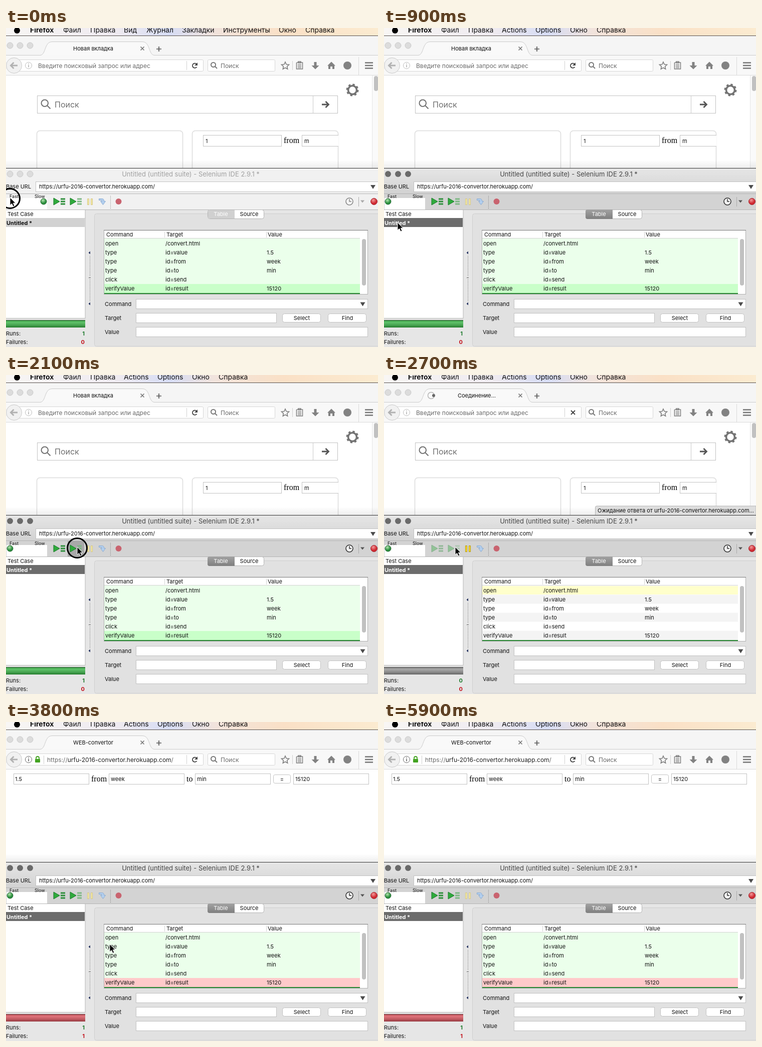
These frames come from a looping animation (742 px wide and 638 px high, 6 s). An HTML page:

```html
<!DOCTYPE html>
<html lang="ru">
<head>
<meta charset="utf-8">
<title>Selenium IDE</title>
<style>
html, body { margin: 0; width: 100%; height: 100%; overflow: hidden; background: #fff; }
svg { display: block; width: 742px; height: 638px; }
text { font: 11px Inter, sans-serif; fill: #111; white-space: pre; }
.menu text { font-size: 14px; }
.b, .menu .b { font-weight: 700; }
.mid { text-anchor: middle; }
.end { text-anchor: end; }
.url { font-size: 12px; fill: #6b6b6b; }
.title { font-size: 13px; fill: #444; text-anchor: middle; }
.serif { font: 16px "Liberation Serif", serif; fill: #000; }
.field { fill: #fff; stroke: #c2c2c2; }
.line { fill: none; stroke: #777; }

/* Timeline: every state is switched on and off by a hard step. */
.blur, .focus, .pass, .run, .fail, .idle, .home, .page, .newtab, .load, .result, .hover, .click {
  animation: 6s step-end infinite;
}
.blur { animation-name: blur; }
.focus { animation-name: focus; }
.pass { animation-name: pass; }
.run { animation-name: run; }
.fail { animation-name: fail; }
.idle { animation-name: idle; }
.home { animation-name: home; }
.page { animation-name: page; }
.newtab { animation-name: pass; }
.load { animation-name: load; }
.result { animation-name: result; }
.hover { animation-name: hover; }
.click { animation-name: click; }
@keyframes blur { 0% { visibility: visible } 3.3%, 100% { visibility: hidden } }
@keyframes focus { 0% { visibility: hidden } 3.3%, 100% { visibility: visible } }
@keyframes pass { 0% { visibility: visible } 36.6%, 100% { visibility: hidden } }
@keyframes run { 0% { visibility: hidden } 36.6% { visibility: visible } 48.3%, 100% { visibility: hidden } }
@keyframes fail { 0% { visibility: hidden } 48.3%, 100% { visibility: visible } }
@keyframes idle { 0% { visibility: visible } 36.6% { visibility: hidden } 48.3%, 100% { visibility: visible } }
@keyframes home { 0% { visibility: visible } 46.6%, 100% { visibility: hidden } }
@keyframes page { 0% { visibility: hidden } 46.6%, 100% { visibility: visible } }
@keyframes load { 0% { visibility: hidden } 36.6% { visibility: visible } 46.6%, 100% { visibility: hidden } }
@keyframes result { 0% { visibility: hidden } 51.6%, 100% { visibility: visible } }
@keyframes hover {
  0% { visibility: hidden } 31.6% { visibility: visible } 36.6% { visibility: hidden }
  48.3% { visibility: visible } 54.9%, 100% { visibility: hidden }
}
@keyframes click {
  0% { visibility: visible } 3.3% { visibility: hidden }
  33.3% { visibility: visible } 36.6%, 100% { visibility: hidden }
}
.cursor { animation: move 6s ease-in-out infinite; }
@keyframes move {
  0%, 4% { transform: translate(8px, 339px) }
  12%, 20% { transform: translate(27px, 389px) }
  33%, 53% { transform: translate(142px, 344px) }
  70%, 77% { transform: translate(237px, 491px) }
  81.5%, 100% { transform: translate(262px, 655px) }
}
.spin { transform-origin: 94px 41px; animation: spin 1s linear infinite; }
@keyframes spin { from { transform: rotate(108deg) } to { transform: rotate(468deg) } }
</style>
</head>
<body>
<svg viewBox="0 0 742 638">
  <defs>
    <linearGradient id="sky">
      <stop offset="0" stop-color="#f8f6f4"/><stop offset=".3" stop-color="#eeeaf0"/>
      <stop offset=".44" stop-color="#d6dcf4"/><stop offset=".56" stop-color="#f1e3dc"/>
      <stop offset=".75" stop-color="#fae0c6"/><stop offset="1" stop-color="#fbebd0"/>
    </linearGradient>
    <linearGradient id="shade" x2="0" y2="1">
      <stop offset="0" stop-color="#000" stop-opacity="0"/><stop offset="1" stop-color="#000" stop-opacity=".07"/>
    </linearGradient>
    <linearGradient id="bar" x2="0" y2="1">
      <stop offset="0" stop-color="#e6e6e6"/><stop offset="1" stop-color="#d2d2d2"/>
    </linearGradient>
    <linearGradient id="tab" x2="0" y2="1">
      <stop offset="0" stop-color="#a2a2a2"/><stop offset="1" stop-color="#7f7f7f"/>
    </linearGradient>
    <linearGradient id="gloss" x2="0" y2="1">
      <stop offset="0" stop-color="#000" stop-opacity=".25"/><stop offset=".3" stop-color="#fff" stop-opacity=".2"/>
      <stop offset="1" stop-color="#000" stop-opacity=".3"/>
    </linearGradient>
    <radialGradient id="green" cx=".4" cy=".3">
      <stop offset="0" stop-color="#b5e6b0"/><stop offset="1" stop-color="#278c3a"/>
    </radialGradient>
    <radialGradient id="red" cx=".4" cy=".3">
      <stop offset="0" stop-color="#f29a9a"/><stop offset="1" stop-color="#cf2830"/>
    </radialGradient>
    <g id="lights"><circle cx="8" r="6"/><circle cx="28" r="6"/><circle cx="48" r="6"/></g>
    <g id="lens" fill="none"><circle cx="-1.5" cy="-1.5" r="4.5"/><path d="M2 2 6 6"/></g>
    <path id="play" d="M0-7 12 0 0 7Z" fill="#2faa3c" stroke="#1c7a2b"/>
    <clipPath id="urlclip"><rect x="60" y="60" width="274" height="30"/></clipPath>
    <clipPath id="cardclip"><rect x="371" y="205" width="292" height="75"/></clipPath>
  </defs>

  <!-- Menu bar -->
  <g class="menu">
    <rect width="742" height="15" fill="url(#sky)"/>
    <circle cx="22" cy="5" r="6"/>
    <text class="b" x="48" y="9">Firefox</text>
    <text x="114" y="9">Файл</text><text x="168" y="9">Правка</text>
    <g class="blur">
      <text x="235" y="9">Вид</text><text x="280" y="9">Журнал</text><text x="351" y="9">Закладки</text>
      <text x="433" y="9">Инструменты</text><text x="544" y="9">Окно</text><text x="597" y="9">Справка</text>
    </g>
    <g class="focus">
      <text x="235" y="9">Actions</text><text x="302" y="9">Options</text>
      <text x="371" y="9">Окно</text><text x="424" y="9">Справка</text>
    </g>
    <rect y="15" width="742" height="1" fill="#57504c"/>
  </g>

  <!-- Browser -->
  <rect y="16" width="742" height="79" fill="#f5f5f5"/>
  <use href="#lights" y="35" fill="#dcdcdc" stroke="#c9c9c9"/>
  <path d="M0 54.500H68C80 54 76 27.500 92 27.500H272C288 27.500 284 54 296 54.500H742" fill="#f9f9f9" stroke="#cbcbcb"/>
  <rect y="55" width="742" height="39" fill="#f8f8f8"/>
  <path class="line" d="M0 94.500H742M703.500 58V94" style="stroke:#dadada"/>
  <g class="newtab"><text class="mid" x="174" y="45">Новая вкладка</text></g>
  <g class="load">
    <text class="mid" x="185" y="45">Соединение…</text>
    <g class="spin"><circle class="line" cx="94" cy="41" r="6.500" style="stroke:#b5b5b5;stroke-width:1.500"/><circle cx="99" cy="41" r="3" fill="#666"/></g>
  </g>
  <g class="page"><text class="mid" x="174" y="45">WEB-convertor</text></g>
  <path class="line" d="M268.500 37.500l7 7m0-7l-7 7" style="stroke-width:1.700"/>
  <path class="line" d="M300 42H310M305 37V47" style="stroke:#555;stroke-width:1.700"/>

  <rect class="field" x="20.500" y="63.500" width="373" height="23" rx="2" style="stroke:#d6d6d6"/>
  <circle cx="16" cy="75" r="15.500" fill="#f1f1f1" stroke="#cacaca"/>
  <path d="M23 75H10M15.500 69 9.500 75l6 6" fill="none" stroke="#b2b2b2" stroke-width="3"/>
  <path class="line" d="M360.500 66V84" style="stroke:#d0d0d0"/>
  <g class="home">
    <circle class="line" cx="45" cy="75" r="6.500" style="stroke:#bbb"/>
    <path d="M45 71v1.500M45 74v4.500" stroke="#aaa" stroke-width="1.500"/>
    <text class="url" x="64" y="80">Введите поисковый запрос или адрес</text>
  </g>
  <g class="page">
    <circle class="line" cx="45" cy="75" r="6.500" style="stroke:#666"/>
    <path d="M45 71v1.500M45 74v4.500" stroke="#555" stroke-width="1.500"/>
    <rect x="58" y="74" width="10" height="7" rx="1" fill="#43a321"/>
    <path d="M60 75V72a3 3 0 0 1 6 0v3" fill="none" stroke="#43a321" stroke-width="1.800"/>
    <path class="line" d="M75.500 67V84" style="stroke:#d0d0d0"/>
    <text class="url" x="82" y="80" clip-path="url(#urlclip)">https://<tspan fill="#222">urfu-2016-convertor.herokuapp.com</tspan>/</text>
  </g>
  <g class="idle"><path d="M380.500 78a4.700 4.700 0 1 1 0-5.500" fill="none" stroke="#444" stroke-width="1.800"/><path d="M382 69v6h-6Z" fill="#444"/></g>
  <path class="load" d="M373 71l8 8m0-8l-8 8" stroke="#444" stroke-width="2"/>
  <rect class="field" x="402.500" y="63.500" width="134" height="23" rx="2" style="stroke:#d6d6d6"/>
  <use href="#lens" x="415" y="75" stroke="#777" stroke-width="2"/>
  <text class="url" x="428" y="80">Поиск</text>

  <g fill="#828282">
    <path d="M557 68l2.200 4.800 5.300.6-3.900 3.600 1 5.200-4.600-2.600-4.600 2.600 1-5.200-3.900-3.600 5.300-.6Z" fill="none" stroke="#828282" stroke-width="1.700"/>
    <path d="M571.500 66V84" stroke="#d0d0d0"/>
    <path d="M580 69H591.500V82H579.500V69M583 67h5v3h-5ZM582 73.500h7M582 76.500h7M582 79.500h7" fill="none" stroke="#828282" stroke-width="1.600"/>
    <path d="M614.500 68h5v7h5l-7.500 7.500-7.500-7.500h5Z"/>
    <path d="M649 67.500l8 8h-2V82h-4v-5h-4v5h-4v-6.500h-2Z"/>
    <circle cx="681" cy="75" r="8"/>
    <path d="M716 69.500h16M716 75h16M716 80.500h16" stroke="#777" stroke-width="2.600"/>
  </g>

  <!-- New tab page -->
  <g class="home">
    <rect y="95" width="742" height="185" fill="#fff"/>
    <rect x="731" y="95" width="11" height="185" fill="#fafafa"/>
    <path d="M730.500 95V280" stroke="#e6e6e6"/>
    <rect x="734" y="96" width="8" height="30" rx="4" fill="#c1c1c1"/>
    <g class="line" style="stroke:#737373">
      <circle cx="691" cy="124" r="8.500" stroke-width="3.600"/>
      <circle cx="691" cy="124" r="11" stroke-width="3" stroke-dasharray="4.320"/>
    </g>
    <rect class="field" x="62.500" y="135.500" width="599" height="35"/>
    <path class="line" d="M612.500 136V170" style="stroke:#c8c8c8"/>
    <use href="#lens" transform="translate(79.500 152.500) scale(1.500)" stroke="#737373" stroke-width="1.400"/>
    <text x="97" y="159" style="font-size:16px;fill:#707070">Поиск</text>
    <path d="M630 153H642M637.500 147l6 6-6 6" fill="none" stroke="#555" stroke-width="2.800"/>
    <g fill="#fff" stroke="#dcdcdc" stroke-width="1.500">
      <rect x="61.500" y="205.500" width="291" height="90" rx="6"/>
      <rect x="371.500" y="205.500" width="291" height="90" rx="6"/>
    </g>
    <g clip-path="url(#cardclip)">
      <rect class="field" x="393.500" y="214.500" width="156" height="22"/>
      <rect class="field" x="590.500" y="214.500" width="156" height="22"/>
    </g>
    <text x="398" y="230">1</text><text class="serif" x="554" y="230">from</text><text x="595" y="230">m</text>
  </g>

  <!-- Converter page -->
  <g class="page">
    <rect y="95" width="742" height="185" fill="#fff"/>
    <g class="field">
      <rect x="15.500" y="103.500" width="150" height="21"/><rect x="205.500" y="103.500" width="150" height="21"/>
      <rect x="377.500" y="103.500" width="150" height="21"/><rect x="573.500" y="103.500" width="150" height="21"/>
      <rect x="533.500" y="105.500" width="34" height="17" rx="3"/>
    </g>
    <text x="18" y="118">1.5</text><text x="209" y="118">week</text><text x="381" y="118">min</text>
    <text class="serif" x="170" y="119">from</text><text class="serif" x="360" y="119">to</text>
    <text class="mid" x="550.500" y="118">=</text>
  </g>
  <text class="result" x="577" y="118">15120</text>
  <rect y="264" width="742" height="16" fill="url(#shade)"/>
  <g class="load">
    <path d="M421.500 280V265a3 3 0 0 1 3-3H742V280" fill="#dedede" stroke="#b4b4b4"/>
    <text x="426" y="275">Ожидание ответа от urfu-2016-convertor.herokuapp.com…</text>
  </g>

  <!-- IDE window -->
  <rect y="280" width="742" height="358" fill="#e6e6e6"/>
  <g class="blur">
    <rect y="281" width="742" height="82" fill="#f1f1f1"/>
    <use href="#lights" y="292" fill="#dcdcdc" stroke="#c9c9c9"/>
    <text class="title" x="368.500" y="297" style="fill:#a0a0a0">Untitled (untitled suite) - Selenium IDE 2.9.1 *</text>
  </g>
  <g class="focus">
    <rect y="281" width="742" height="50" fill="url(#bar)"/>
    <rect y="331" width="742" height="32" fill="#d3d3d3"/>
    <use href="#lights" y="292" fill="#6a6a6a"/>
    <text class="title" x="368.500" y="297">Untitled (untitled suite) - Selenium IDE 2.9.1 *</text>
  </g>
  <rect y="280" width="742" height="1" fill="#333"/>
  <text x="0" y="321">Base URL</text>
  <rect class="field" x="59.500" y="307.500" width="690" height="20"/>
  <text x="66" y="321">https://urfu-2016-convertor.herokuapp.com/</text>
  <path d="M727 314h10l-5 8Z" fill="#4c4c4c"/>
  <path class="line" d="M0 331.500H742M0 363.500H742" style="stroke:#b3b3b3"/>

  <!-- Toolbar -->
  <text x="7" y="340" style="font-size:9px">Fast</text><text x="57" y="340" style="font-size:9px">Slow</text>
  <rect x="1" y="340" width="81" height="23" fill="#fff"/>
  <g fill="url(#green)" stroke="#2c6b38"><circle class="blur" cx="75" cy="347" r="6"/><circle class="focus" cx="8" cy="347" r="6"/></g>
  <rect class="hover" x="123" y="332" width="33" height="31" fill="#a9a9a9"/>
  <g id="tools">
    <g class="idle">
      <use href="#play" x="95" y="347"/><use href="#play" x="128" y="347"/>
      <path d="M109 342h9M109 347h9M109 352h9" stroke="#2e8f3c" stroke-width="3.200"/>
      <path d="M142 342h9M142 347h9M142 352h9" stroke="#7db884" stroke-width="3.200"/>
      <path d="M162.500 341.500h3v12h-3zM169.500 341.500h3v12h-3z" fill="#f5eba6" stroke="#d2c486"/>
    </g>
    <g class="run">
      <g opacity=".4">
        <use href="#play" x="95" y="347"/><use href="#play" x="128" y="347"/>
        <path d="M109 342h9M109 347h9M109 352h9" stroke="#2e8f3c" stroke-width="3.200"/>
        <path d="M142 342h9M142 347h9M142 352h9" stroke="#7db884" stroke-width="3.200"/>
      </g>
      <path d="M162.500 341.500h3v12h-3zM169.500 341.500h3v12h-3z" fill="#ffe135" stroke="#b0920c"/>
    </g>
  </g>
  <path d="M185.500 341.500h6q4 0 4 5h3l-5 7-5-7h3q0-2-2-2h-4Z" fill="#b4d0ef" stroke="#8aabd2"/>
  <path d="M208.500 336V361" stroke="#666" stroke-dasharray="1 2"/>
  <circle cx="224.500" cy="347" r="6" fill="#c9636f"/>
  <g fill="none" stroke="#333">
    <g class="blur" stroke="#888"><circle cx="685" cy="347" r="7" fill="#f5f5f5" stroke-width="1.600"/><path d="M685 342V347H689" stroke-width="1.500"/></g>
    <g class="focus"><circle cx="685" cy="347" r="7" fill="#f5f5f5" stroke-width="1.600"/><path d="M685 342V347H689" stroke-width="1.500"/></g>
    <path d="M703.500 338V357" stroke="#aaa"/>
  </g>
  <path class="blur" d="M707 344.500h8l-4 5Z" fill="#aaa"/>
  <path class="focus" d="M707 344.500h8l-4 5Z" fill="#555"/>
  <circle cx="734" cy="347" r="6.500" fill="url(#red)" stroke="#a32830"/>

  <!-- Test list -->
  <rect x="-1" y="363.500" width="159" height="217" fill="#fff" stroke="#b5b5b5"/>
  <text x="3" y="376">Test Case</text>
  <path class="line" d="M0 380.500H158" style="stroke:#c4c4c4"/>
  <g class="blur"><rect y="380" width="157" height="18" fill="#d2d2d2"/><text class="b" x="1" y="394">Untitled *</text></g>
  <g class="focus"><rect y="380" width="157" height="18" fill="#6c6c6c"/><text class="b" x="1" y="394" style="fill:#fff">Untitled *</text></g>
  <g>
    <rect class="pass" y="584" width="158" height="15" fill="#35b243"/>
    <rect class="run" y="584" width="158" height="15" fill="#919191"/>
    <rect class="fail" y="584" width="158" height="15" fill="#d8505a"/>
    <rect y="584" width="158" height="15" fill="url(#gloss)"/>
    <path d="M0 584.500H158" stroke="#444" stroke-opacity=".6"/>
  </g>
  <text x="0" y="615">Runs:</text><text x="0" y="632">Failures:</text>
  <g class="b end">
    <g style="--c:#1d7a2c">
      <text class="idle b" x="157" y="615" style="fill:#1d7a2c">1</text>
      <text class="run b" x="157" y="615" style="fill:#1d7a2c">0</text>
    </g>
    <text class="pass b" x="157" y="632" style="fill:#c3121c">0</text>
    <text class="run b" x="157" y="632" style="fill:#c3121c">0</text>
    <text class="fail b" x="157" y="632" style="fill:#c3121c">1</text>
  </g>
  <path d="M167.500 456V496M167.500 503V546" stroke="#555" stroke-dasharray="1 2"/>
  <path d="M168 446.500v6l-3.500-3ZM168 548.500v6l-3.500-3Z" fill="#22305e"/>
  <path d="M165 499.500h4" stroke="#555"/>

  <!-- Editor -->
  <rect x="176.500" y="371.500" width="575" height="265" rx="4" fill="#e1e1e1" stroke="#cfcfcf"/>
  <rect x="402.500" y="363.500" width="112" height="18" rx="4" fill="#fff" stroke="#b4b4b4"/>
  <path class="blur" d="M456 364H406q-3 0-3 3v11q0 3 3 3H456Z" fill="#d0d0d0"/>
  <path class="focus" d="M456 363H406q-4 0-4 4v11q0 4 4 4H456Z" fill="url(#tab)"/>
  <text class="mid" x="428.500" y="376" style="fill:#fff">Table</text><text class="mid" x="485" y="376">Source</text>

  <rect x="195.500" y="404.500" width="526" height="128" fill="#fff" stroke="#b0b0b0"/>
  <path d="M195 404.500H722" stroke="#777"/>
  <path d="M196 420.500H706M316.500 407V419M519.500 407V419" stroke="#d2d2d2"/>
  <g class="pass"><rect x="196" y="421" width="510" height="91" fill="#ebffeb"/><rect x="196" y="512" width="510" height="18" fill="#c9ffc9"/></g>
  <g class="run">
    <rect x="196" y="422" width="510" height="17" fill="#ffffcb"/>
    <path d="M196 448.500H706M196 484.500H706M196 520.500H706" stroke="#f4f4f4" stroke-width="18"/>
  </g>
  <g class="fail"><rect x="196" y="421" width="510" height="91" fill="#ebffeb"/><rect x="196" y="512" width="510" height="18" fill="#ffcaca"/></g>
  <rect x="196" y="530" width="510" height="2" fill="#2b8a36"/>
  <rect x="710" y="422" width="8" height="93" rx="4" fill="#c1c1c1"/>
  <text x="200" y="417">Command</text><text x="320" y="417">Target</text><text x="522" y="417">Value</text>
  <g id="rows"></g>

  <text x="197" y="556">Command</text><text x="197" y="584">Target</text><text x="197" y="612">Value</text>
  <g class="field">
    <rect x="259.500" y="542.500" width="462" height="19"/><rect x="259.500" y="570.500" width="280" height="19"/>
    <rect x="259.500" y="598.500" width="462" height="19"/>
    <rect x="551.500" y="571.500" width="76" height="17" rx="4"/><rect x="642.500" y="571.500" width="76" height="17" rx="4"/>
  </g>
  <path d="M706.500 548.500h10l-5 8Z" fill="#4c4c4c"/>
  <text class="mid" x="590" y="584">Select</text><text class="mid" x="681" y="584">Find</text>

  <!-- Pointer -->
  <g class="cursor">
    <circle class="click" cy="2" r="19.500" fill="none" stroke="#000" stroke-width="3"/>
    <path d="M0 0V15.500L3.600 12.200 6.200 18 9 16.800 6.400 11.200H11Z" fill="#000" stroke="#fff"/>
  </g>
</svg>
<script>
const steps = [
  ["open", "/convert.html", ""],
  ["type", "id=value", "1.5"],
  ["type", "id=from", "week"],
  ["type", "id=to", "min"],
  ["click", "id=send", ""],
  ["verifyValue", "id=result", "15120"]
];
const columns = [198, 318, 520];
document.getElementById("rows").innerHTML = steps.map((step, row) =>
  step.map((cell, i) => `<text x="${columns[i]}" y="${435 + 18 * row}">${cell}</text>`).join("")
).join("");
</script>
</body>
</html>
```
